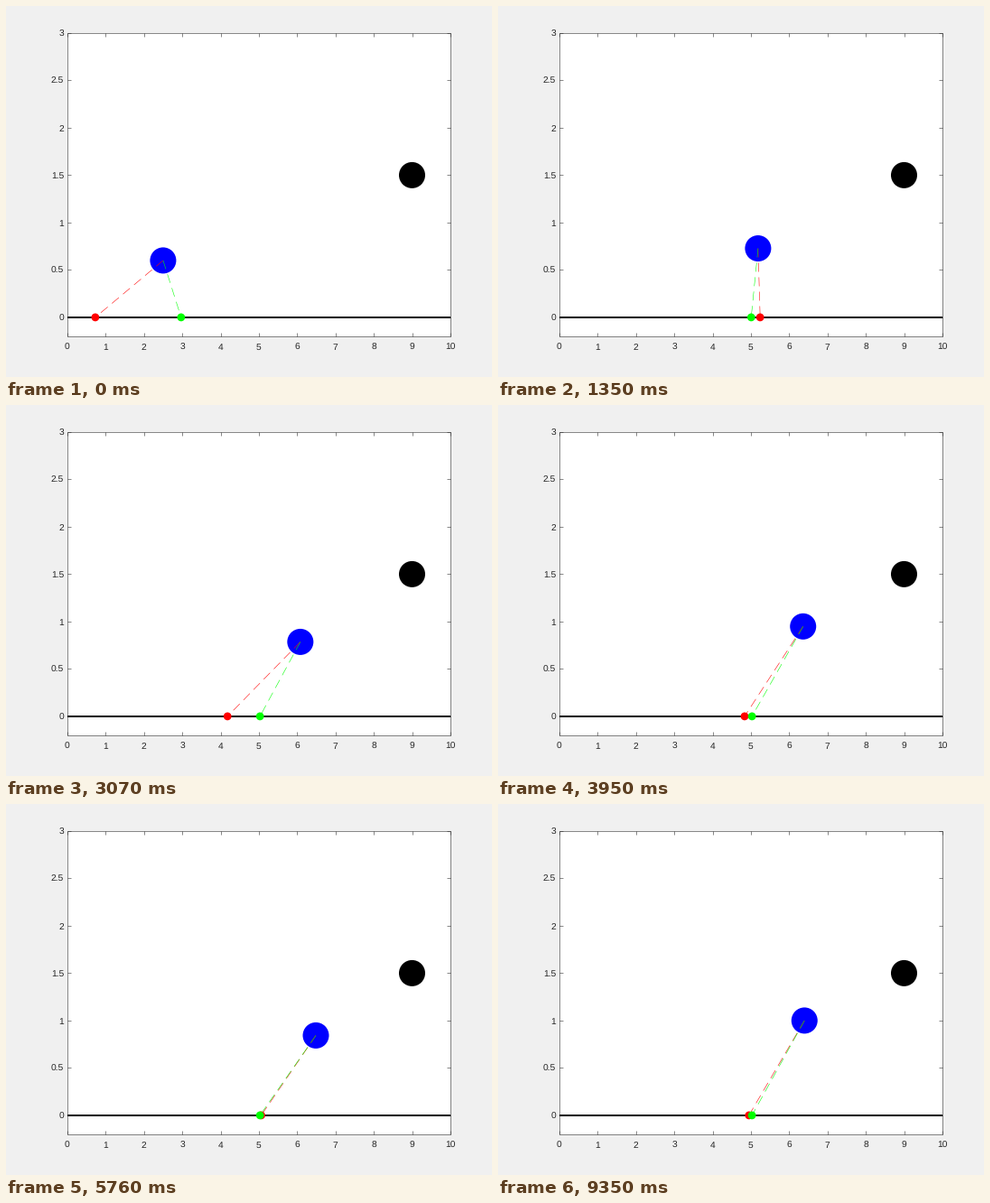
A matplotlib script for the animation above (9.53 s loop, 538 px wide and 411 px high).

```python
import numpy as np
import matplotlib.pyplot as plt
from matplotlib.animation import FuncAnimation
from matplotlib.collections import LineCollection
from matplotlib.patches import Circle, Polygon, Rectangle

W, H, DPI = 538, 411, 100
LOOP, FRAMES = 9530, 238
PX = 72 / DPI  # points per pixel
INK = "0.15"

plt.rcParams.update({"font.family": "Liberation Sans", "text.hinting": "none"})
fig = plt.figure(figsize=(W / DPI, H / DPI), dpi=DPI, facecolor="#f0f0f0")
ax = fig.add_axes([0, 0, 1, 1])
ax.set(xlim=(0, W), ylim=(H, 0))
ax.axis("off")


def sx(v):
    return 67.9 + 42.4 * v


def sy(v):
    return 344.9 - 105 * v


def curve(*keys):
    """Smooth curve through (ms, value) keys that never overshoots them."""
    t, v = np.array(keys, float).T
    h = np.diff(t)
    d = np.diff(v) / h
    m = np.zeros(len(t))
    for k in range(1, len(t) - 1):
        if d[k - 1] * d[k] > 0:
            m[k] = 2 * d[k - 1] * d[k] / (d[k - 1] + d[k])

    def at(time):
        time = min(max(time, t[0]), t[-1])
        k = min(np.searchsorted(t, time, side="right") - 1, len(h) - 1)
        s = (time - t[k]) / h[k]
        ease = s * s * (3 - 2 * s)
        bend = h[k] * s * (1 - s) * (m[k] * (1 - s) - m[k + 1] * s)
        return v[k] + (v[k + 1] - v[k]) * ease + bend

    return at


# Mostly the turning points of each damped swing
START, END = 150, 7020
ball_x = curve((START, 2.5), (700, 4.4), (1990, 5.64), (5100, 6.52), (END, 6.4))
ball_y = curve((START, 0.6), (850, 0.847), (2050, 0.52), (3800, 0.95),
               (5950, 0.84), (END, 1))
red_x = curve((START, 0.73), (780, 7.53), (1250, 5.5), (2100, 3.77),
              (4750, 5.14), (END, 4.95))
green_x = curve((START, 2.97), (700, 4.8), (1600, 5.03))

# A mouse pointer brushes the bottom edge near the end
POINTER_START, POINTER_END = 9010, 9329
ARROW = np.array([(0, 0), (0, 14), (3.2, 11), (5.4, 16), (7.6, 15),
                  (5.5, 10.2), (10, 10)])


def draw_axes():
    left, right, top, bottom = sx(0), sx(10), sy(3), sy(-0.2)
    ax.add_patch(Rectangle((left, top), right - left, bottom - top, fc="white", lw=0))
    segments = [[(left, y), (right, y)] for y in (top, bottom)]
    segments += [[(x, top), (x, bottom)] for x in (left, right)]
    size, font = 4.2, 10.3 * PX
    for v in range(11):
        x = sx(v)
        segments += [[(x, bottom), (x, bottom - size)], [(x, top), (x, top + size)]]
        ax.text(x, 380.7, f"{v}", ha="center", va="baseline", size=font, color=INK)
    for v in np.arange(0, 3.1, 0.5):
        y = sy(v)
        segments += [[(left, y), (left + size, y)], [(right, y), (right - size, y)]]
        ax.text(64, y + 4, f"{v:g}", ha="right", va="baseline", size=font, color=INK)
    ax.add_collection(LineCollection(segments, colors=INK, linewidths=0.55 * PX, zorder=2))
    ax.plot([left, right], [sy(0)] * 2, color="black", lw=2 * PX,
            solid_capstyle="butt", zorder=3)


def disc(x, y, radius, color, z):
    return ax.add_patch(Circle((sx(x), sy(y)), radius, fc=color, lw=0, zorder=z))


def leg(color, z):
    width = 0.55
    return ax.plot([], [], color=color, lw=width * PX, dash_capstyle="butt",
                   dashes=(10 / width, 6 / width), zorder=z)[0]


draw_axes()
disc(9, 1.5, 14.5, "black", 4)
ball = disc(2.5, 0.6, 14.5, "blue", 5)
red_leg, green_leg = leg("red", 6), leg("lime", 7)
red_dot = disc(0.73, 0, 4.4, "red", 8)
green_dot = disc(2.97, 0, 4.4, "lime", 9)
pointer = ax.add_patch(Polygon(ARROW, fc="black", ec="white", lw=0.8 * PX, zorder=10))


def update(i):
    t = (i + 0.5) * LOOP / FRAMES
    bx, by = sx(ball_x(t)), sy(ball_y(t))
    ball.center = bx, by
    for dot, line, path in ((red_dot, red_leg, red_x), (green_dot, green_leg, green_x)):
        foot = sx(path(t))
        dot.center = foot, sy(0)
        line.set_data([bx, foot], [by, sy(0)])

    pointer.set_visible(POINTER_START <= t < POINTER_END)
    away = abs((t - POINTER_START) // 64 - 2)
    pointer.set_xy(ARROW + (440 + 15 * away, 383 + 10 * away))
    return ball, red_dot, green_dot, red_leg, green_leg, pointer


anim = FuncAnimation(fig, update, frames=FRAMES, interval=LOOP / FRAMES,
                     repeat=True, repeat_delay=0, blit=False)
plt.show()
```
